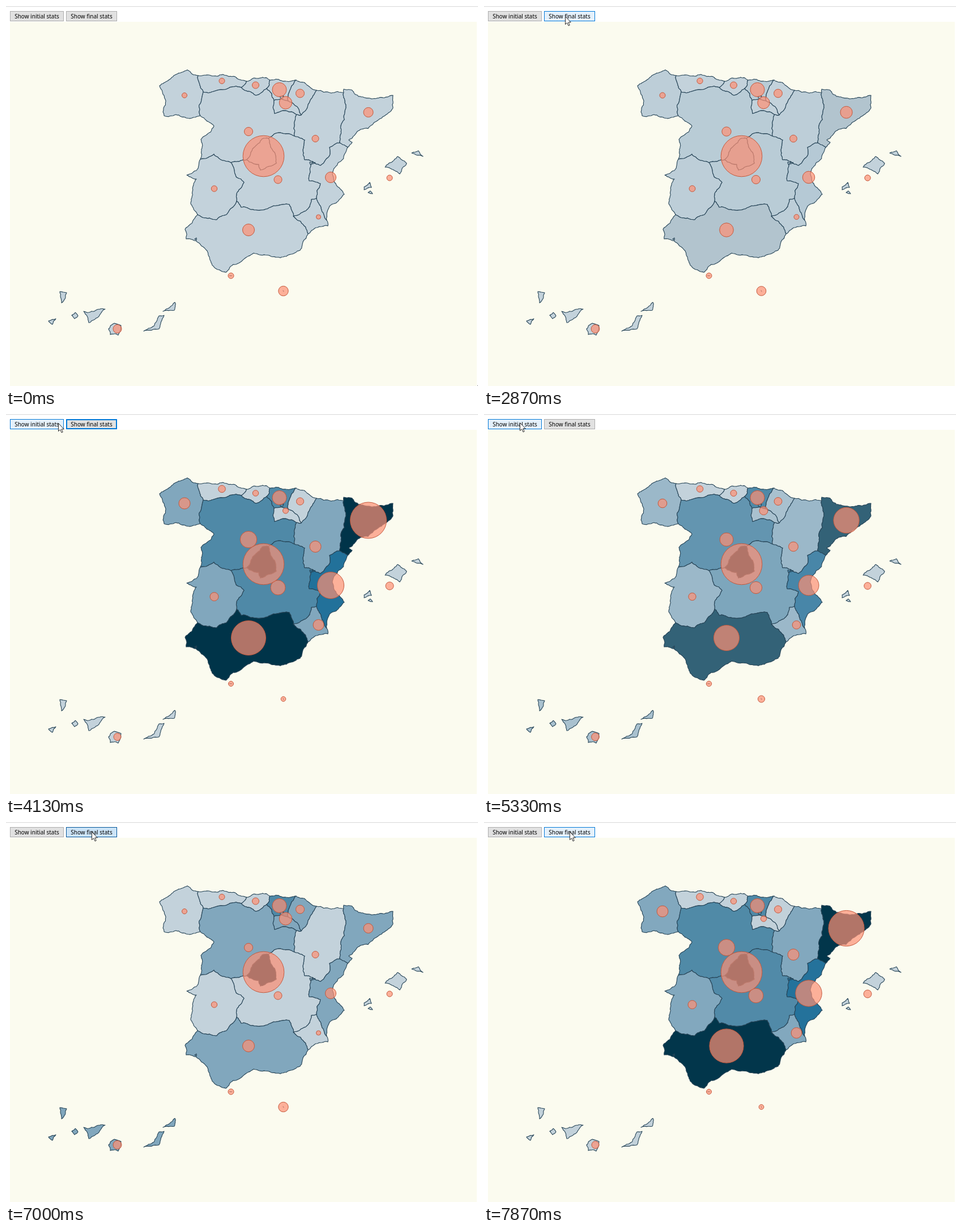
An HTML page for the animation above (8000 ms loop, 833 by 672 pixels).

```html
<!DOCTYPE html>
<html lang="en">
<head>
<meta charset="utf-8">
<title>Regional stats map</title>
<style>
  html, body { margin: 0; width: 100%; height: 100%; overflow: hidden; background: #fff; }
  svg { display: block; }
  #land path { stroke: #264457; stroke-width: 1.1; stroke-linejoin: round; }
  #bubbles circle { fill: rgb(253, 144, 117); fill-opacity: .7; stroke: #c4593d; }
  text { font: 10px "Noto Sans", "Open Sans", sans-serif; text-anchor: middle; fill: #000; }
</style>
</head>
<body>
<svg width="833" height="672" viewBox="0 0 833 672">
  <rect width="833" height="672" fill="#fff"/>
  <rect width="833" height="1.5" fill="#e3e3e3"/>
  <rect x="7" y="28" width="824" height="644" fill="#fbfbef"/>
  <g id="land"></g>
  <g id="bubbles"></g>
  <g id="buttons"></g>
  <path id="cursor" d="M0 0V14L3.2 11.2L5.6 16.4L7.7 15.4L5.4 10.4H9.8Z" fill="#fff" stroke="#111" stroke-width=".9"/>
</svg>
<script>
const LOOP = 8000;
const NS = 'http://www.w3.org/2000/svg';
const SHADES = [[195, 210, 219], [129, 167, 189], [79, 137, 167], [34, 113, 154], [0, 52, 73]];
const LIMITS = [7.2, 12, 20, 30]; // bubble radius at which each next shade begins

// Key points of the borders between regions; the detail is added by roughen().
const ARCS = {
  galCoast: '339,123 320,113 300,121 287,131 271,141 276,152 282,168 279,194',
  galSouth: '279,194 300,192 318,198 343,194',
  galAst: '339,123 341,136 348,152',
  galCyl: '348,152 341,175 343,194',
  astCoast: '339,123 383,121 424,133',
  astCant: '424,133 415,144',
  astCyl: '348,152 383,148 415,144',
  cantCoast: '424,133 453,126 466,131',
  cantPv: '466,131 460,146',
  cantCyl: '415,144 441,158 460,146',
  pvCoast: '466,131 494,133 512,131',
  pvNav: '512,131 502,147 498,168',
  pvCyl: '460,146 473,167',
  pvRio: '473,167 498,168',
  rioNav: '498,168 517,183 521,193',
  rioCyl: '473,167 474,190 497,186 513,192',
  rioAr: '513,192 521,193',
  navFr: '512,131 526,135 548,149',
  navAr: '548,149 533,175 521,193',
  cylAr: '513,192 508,216 509,230',
  arFr: '548,149 574,154 596,153',
  arCat: '596,153 598,188 591,212 589,242',
  catFr: '596,153 596,147 611,149 622,160 642,163 683,158',
  catCoast: '683,158 683,180 655,203 619,223 605,237 611,241 603,250',
  catVal: '589,242 603,250',
  arVal: '589,242 571,250 572,262 555,282 541,275',
  arClm: '509,230 527,237 524,256 527,272 541,275',
  clmVal: '541,275 535,300 535,309 555,314 548,340',
  valMur: '548,340 556,358 566,379',
  valCoast: '603,250 581,285 576,298 582,314 597,333 571,354 566,379',
  murCoast: '566,379 568,389 547,392 533,403',
  clmMur: '548,340 539,342 536,355 507,372',
  murAnd: '507,372 520,381 533,403',
  clmAnd: '407,345 415,356 432,360 478,353 500,351 507,372',
  extAnd: '338,369 372,378 389,369 407,345',
  extClm: '397,277 406,302 420,312 411,325 407,345',
  extPort: '343,271 336,291 319,299 336,306 329,328 326,350 338,369',
  extCyl: '343,271 367,262 397,277',
  cylPort: '343,194 367,212 361,223 344,236 343,271',
  cylClmWest: '397,277 425,272',
  madWest: '425,272 441,247 452,235 463,234',
  madEast: '463,234 470,254 477,278 449,290 446,280 425,272',
  cylClmEast: '463,234 481,224 509,230',
  andEast: '533,403 519,432 437,437 401,457 388,471',
  andWest: '388,471 366,460 355,433 335,415 318,412 316,395 338,369',
  trevino: '483,160 490,159 487,165 483,160',
  ademuz: '536,276 546,277 537,280 536,276',
  huelva: '333,412 336,410 336,414 333,412',
  mallorca: '669,285 691,266 707,278 695,297 669,285',
  menorca: '716,260 728,256 736,266 716,260',
  ibiza: '632,320 642,312 645,321 632,325 632,320',
  formentera: '639,330 643,327 647,332 639,330',
  palma: '95,505 107,507 98,525 95,505',
  gomera: '116,547 122,542 127,548 121,553 116,547',
  hierro: '75,557 88,553 82,563 75,557',
  tenerife: '137,540 175,536 159,552 146,560 137,540',
  granCan: '181,571 191,561 203,565 198,582 184,581 181,571',
  fuerte: '243,575 261,566 270,548 279,547 270,571 243,575',
  lanzarote: '277,540 298,524 297,538 277,540',
  ceuta: '394,477 399,477 394,477',
  melilla: '489,503 490,505 489,503'
};

// Rings (split by "|", "-" reverses an arc), bubble x, y, initial radius, final radius.
const REGIONS = [
  ['galCoast galSouth -galCyl -galAst', 315, 158, 4.5, 10],
  ['astCoast astCant -astCyl -galAst', 381, 132.5, 5, 6.3],
  ['cantCoast cantPv -cantCyl -astCant', 440.5, 140, 6, 5.2],
  ['pvCoast pvNav -pvRio -pvCyl -cantPv', 482.5, 148, 12.5, 12.5],
  ['galCyl cylPort extCyl cylClmWest madWest cylClmEast -cylAr -rioCyl -pvCyl -cantCyl -astCyl|trevino', 428, 222, 7.5, 14.7],
  ['navFr navAr -rioNav -pvNav', 519, 154.5, 7.5, 6.5],
  ['pvRio rioNav -rioAr -rioCyl', 493.5, 171, 11.2, 5],
  ['arFr arCat arVal -arClm -cylAr rioAr -navAr', 546, 234.5, 6, 10],
  ['catFr catCoast -catVal -arCat', 639.5, 188, 8.5, 32],
  ['cylClmEast arClm clmVal clmMur -clmAnd -extClm cylClmWest -madEast', 480, 307, 7, 13],
  ['madWest madEast', 454.5, 265.5, 36.3, 36.3],
  ['extCyl extClm -extAnd -extPort', 367.5, 323, 5.2, 7.5],
  ['catVal valCoast -valMur -clmVal -arVal|ademuz', 573, 303, 9.5, 23.5],
  ['valMur murCoast -murAnd -clmMur', 551.5, 373, 4, 9.5],
  ['clmAnd murAnd andEast andWest extAnd|huelva', 428, 396, 10.5, 30.5],
  ['mallorca|menorca|ibiza|formentera', 677, 304, 5, 7],
  ['palma|gomera|hierro|tenerife|granCan|fuerte|lanzarote', 196.5, 571, 7.5, 6.5],
  ['ceuta', 397, 477, 5, 4.5],
  ['melilla', 489.5, 504, 8.7, 4.3]
];

const BUTTONS = [[7, 95, 'Show initial stats'], [106, 90, 'Show final stats']];
const CLICKS = [[2590, 1], [4868, 0], [7040, 1]]; // time, button
const HOLD = 60;

// Pointer moves: start, end, x, y, ease-out power.
const MOVES = [
  [90, 930, 261, 298, 1], [930, 1130, 206, 205, 1], [1130, 1800, 143, 18, 2],
  [3870, 4530, 63, 15, 2], [5940, 6600, 151, 17, 2]
];

let seed = 11;
const random = () => (seed = (seed * 16807) % 2147483647) / 2147483647;
const lerp = (a, b, k) => a + (b - a) * k;
const clamp = k => Math.min(1, Math.max(0, k));
const cubicInOut = k => k < .5 ? 4 * k ** 3 : 1 - 4 * (1 - k) ** 3;
const shadeOf = r => SHADES[LIMITS.filter(limit => r >= limit).length];
const $ = id => document.getElementById(id);

function set(el, attrs) {
  for (const key in attrs) el.setAttribute(key, attrs[key]);
  return el;
}

const make = (tag, attrs, parent) => parent.appendChild(set(document.createElementNS(NS, tag), attrs));

// Fractal line from a to b, without b.
function split(a, b) {
  const dx = b[0] - a[0], dy = b[1] - a[1];
  if (Math.hypot(dx, dy) < 3.5) return [a];
  const off = (random() - .5) * .24;
  const mid = [(a[0] + b[0]) / 2 - dy * off, (a[1] + b[1]) / 2 + dx * off];
  return [...split(a, mid), ...split(mid, b)];
}

function roughen(text) {
  const pts = text.split(' ').map(p => p.split(',').map(Number));
  return [...pts.slice(1).flatMap((p, i) => split(pts[i], p)), pts[pts.length - 1]];
}

const arcs = {};
for (const name in ARCS) arcs[name] = roughen(ARCS[name]);

function ringPath(ring) {
  const pts = ring.split(' ').flatMap(name =>
    name[0] === '-' ? [...arcs[name.slice(1)]].reverse() : arcs[name]);
  return 'M' + pts.map(p => p.map(v => v.toFixed(1)).join(' ')).join('L') + 'Z';
}

const regions = REGIONS.map(([rings, cx, cy, r0, r1]) => ({
  r0, r1,
  shape: make('path', { d: rings.split('|').map(ringPath).join('') }, $('land')),
  bubble: make('circle', { cx, cy }, $('bubbles'))
}));

const boxes = BUTTONS.map(([x, w, label]) => {
  const box = make('rect', {}, $('buttons'));
  make('text', { x: x + w / 2, y: 22 }, $('buttons')).textContent = label;
  return box;
});

function pointerAt(t) {
  let x = 832, y = 671;
  for (const [start, end, toX, toY, power] of MOVES) {
    const k = 1 - (1 - clamp((t - start) / (end - start))) ** power;
    x = lerp(x, toX, k);
    y = lerp(y, toY, k);
  }
  return [x, y];
}

function drawMap(t) {
  const [toFinal, toInitial, again] = CLICKS.map(([at]) => cubicInOut(clamp((t - at) / 1000)));
  const share = toFinal - toInitial + again;
  for (const { r0, r1, shape, bubble } of regions) {
    // The map starts in one plain shade until the first change is done.
    const from = toInitial ? shadeOf(r0) : SHADES[0], to = shadeOf(r1);
    shape.setAttribute('fill', `rgb(${from.map((v, c) => Math.round(lerp(v, to[c], share)))})`);
    bubble.setAttribute('r', lerp(r0, r1, share).toFixed(2));
  }
}

function drawButtons(t, px, py) {
  const [at, active] = CLICKS.filter(c => t >= c[0] - HOLD).pop() || [0, -1];
  BUTTONS.forEach(([x, w], i) => {
    const hover = px >= x && px < x + w && py >= 9 && py < 27;
    const focus = active === i, down = focus && t < at + HOLD / 2;
    const line = focus && !hover ? 2 : 1;
    set(boxes[i], {
      x: x + line / 2, y: 9 + line / 2, width: w - line, height: 18 - line,
      fill: down ? '#cce4f7' : hover ? '#e5f1fb' : '#e1e1e1',
      stroke: down ? '#005499' : hover || focus ? '#0078d7' : '#adadad',
      'stroke-width': line
    });
  });
}

function draw(t) {
  const [x, y] = pointerAt(t);
  drawMap(t);
  drawButtons(t, x, y);
  $('cursor').setAttribute('transform', `translate(${Math.round(x) + .5} ${Math.round(y) + .5})`);
}

const begin = performance.now();
function tick() {
  draw((performance.now() - begin) % LOOP);
  requestAnimationFrame(tick);
}
tick();
</script>
</body>
</html>
```
